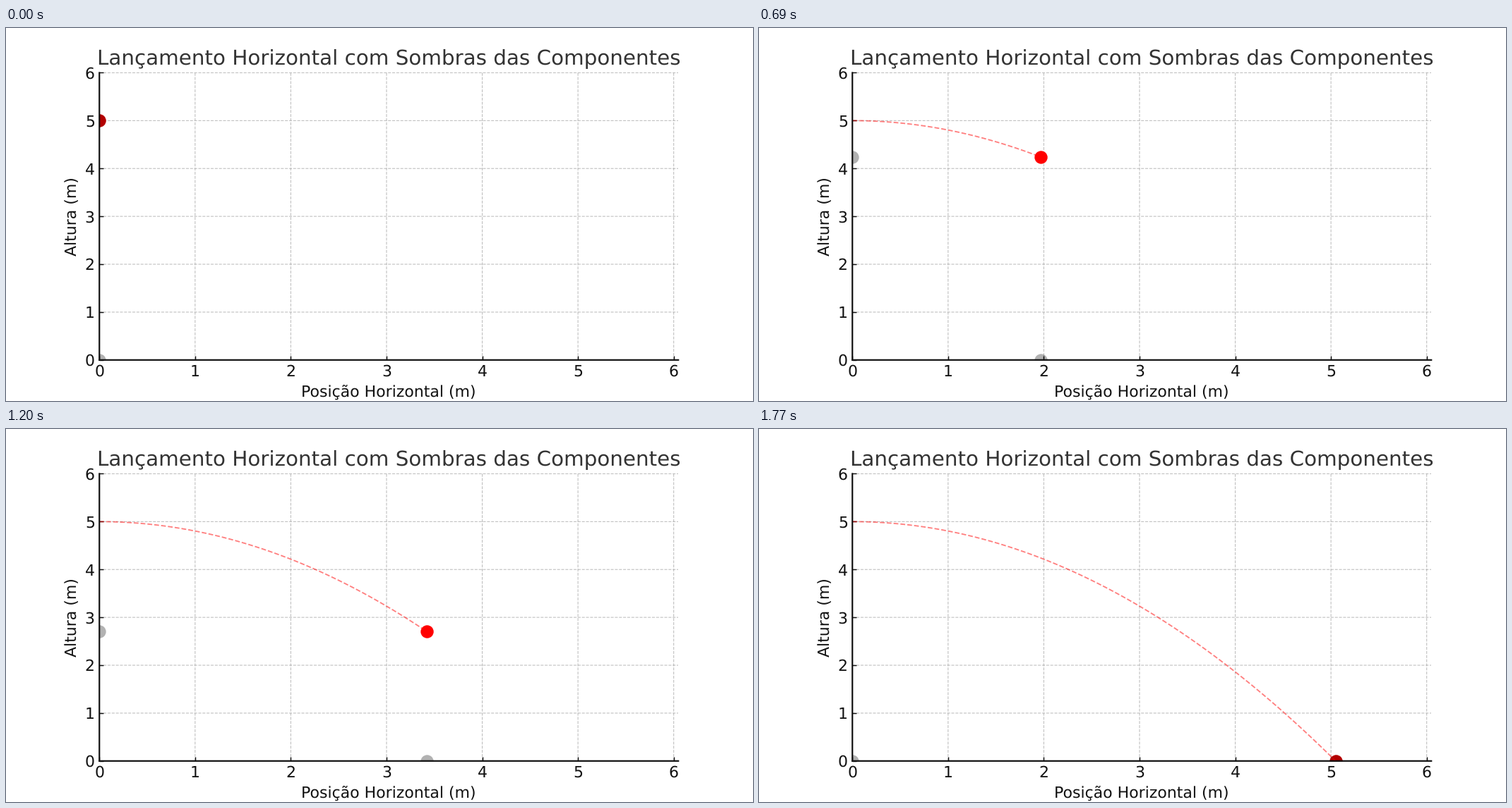
Write a matplotlib script that moves like this. It is 1058 px wide and 529 px high and loops after 1800 ms.

```python
import numpy as np
import matplotlib.pyplot as plt
from matplotlib.animation import FuncAnimation

G, HEIGHT, SPEED = 9.81, 5.0, 5.0
FRAMES, INTERVAL = 60, 30
INK = "#111111"

# Unhinted text and unsnapped lines keep true sub-pixel positions
plt.rcParams.update({
    "font.family": "DejaVu Sans",
    "font.size": 12,
    "text.hinting": "none",
    "path.snap": False,
    "axes.titlesize": 16,
    "axes.titlecolor": "#333333",
    "axes.labelcolor": INK,
    "axes.edgecolor": INK,
    "axes.linewidth": 1.2,
    "xtick.color": INK,
    "ytick.color": INK,
    "xtick.direction": "in",
    "ytick.direction": "in",
    "lines.markeredgewidth": 0,
})

# Free fall from rest height with constant horizontal speed
t = np.linspace(0, np.sqrt(2 * HEIGHT / G), FRAMES)
x = SPEED * t
y = HEIGHT - G * t**2 / 2

fig, ax = plt.subplots(figsize=(8, 4), dpi=132.25)
ax.set_xlim(0, x[-1] + 1)
ax.set_ylim(0, 6)
ax.set_title("Lançamento Horizontal com Sombras das Componentes")
ax.set_xlabel("Posição Horizontal (m)")
ax.set_ylabel("Altura (m)")
ax.grid(True, linestyle="--", linewidth=0.6, color="#b0b0b0", alpha=0.8)
ax.spines[["top", "right"]].set_visible(False)


def dot(color, alpha=1.0):
    return ax.plot([], [], "o", color=color, alpha=alpha, markersize=10)[0]


ball = dot("red")
shadow_x = dot("black", 0.3)
shadow_y = dot("black", 0.3)
trail, = ax.plot([], [], "--", color="red", linewidth=1, alpha=0.5)


def update(i):
    ball.set_data([x[i]], [y[i]])
    shadow_x.set_data([x[i]], [0])
    shadow_y.set_data([0], [y[i]])
    trail.set_data(x[:i + 1], y[:i + 1])
    return ball, shadow_x, shadow_y, trail


anim = FuncAnimation(fig, update, frames=FRAMES, interval=INTERVAL,
                     repeat=True, repeat_delay=0)
plt.show()
```
